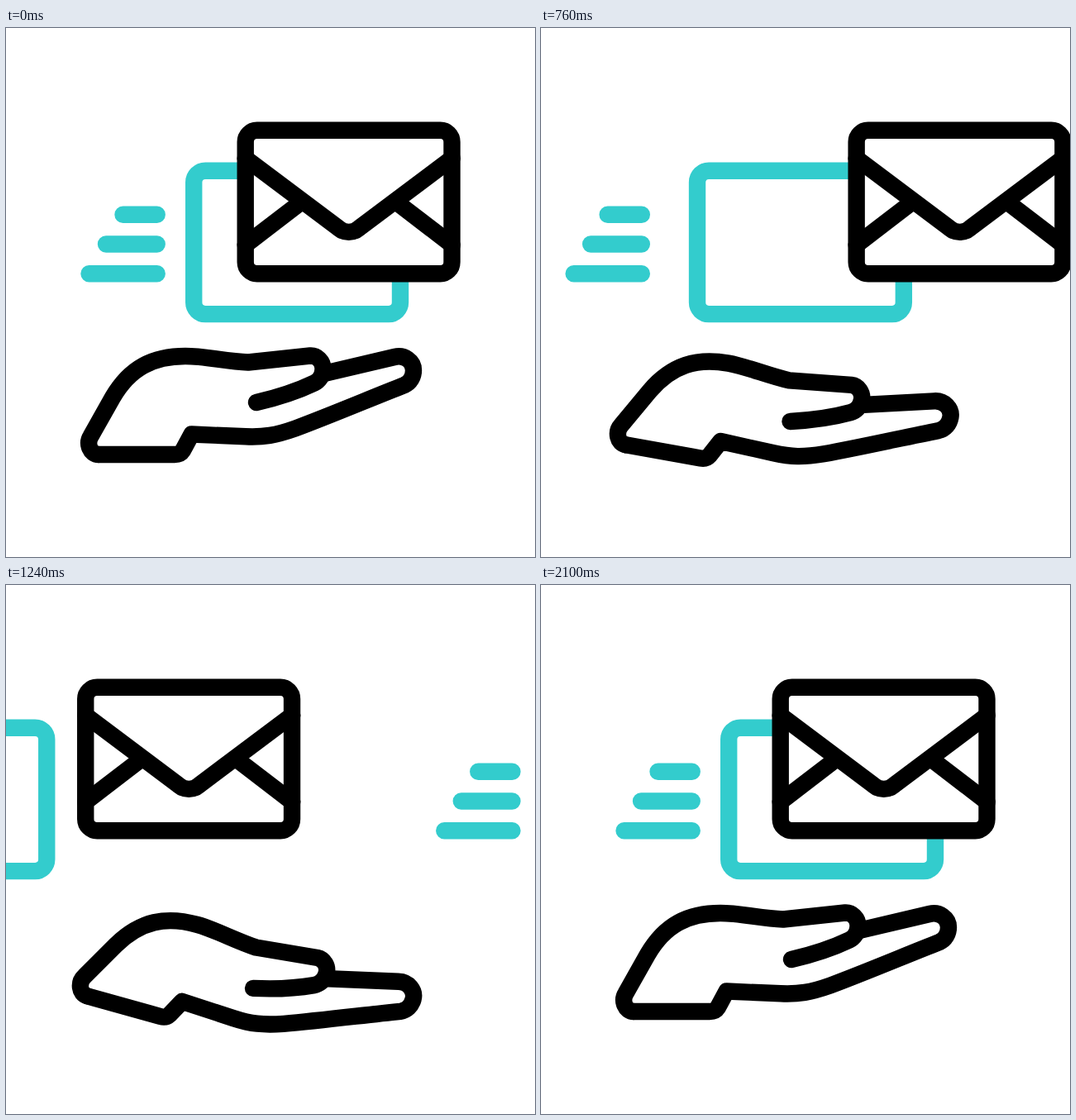
An HTML page for the animation above (2400 ms loop, 640x640 px).

```html
<!DOCTYPE html>
<html>
<head>
<meta charset="utf-8">
<style>
  html, body { margin: 0; height: 100%; overflow: hidden; background: #fff; }
  svg { display: block; width: 100%; height: 100%; }
  g { fill: none; stroke: #000; stroke-width: 20.4; stroke-linecap: round; stroke-linejoin: round; }
  .teal { stroke: #33cccd; }
  rect { fill: #fff; width: 249.8px; height: 173.4px; rx: 14px; }
</style>
</head>
<body>
<svg viewBox="0 0 640 640">
  <g id="hand">
    <path d="M112 516H204Q211 516 214 511L224.5 491.5L290 494.3C312 495.2 326 493 350 484.5C394 468 440 448.5 482 432C489 429 493 422 493 414C493 403 482 395 470 398L387 417.5"/>
    <path d="M303 453C327 447.5 350 440.5 373 429.5C378 427 383.5 421 383.5 412C383.5 403 376 396 368 396.5L293 404.5C265 403 240 397 217 397C178 397 150 411 129 447L102.5 494C97 503 102 516 112 516"/>
  </g>
  <g id="lines" class="teal">
    <path d="M141.5 225.7H182.7M121 261.5H182.7M100.5 297.3H182.7"/>
  </g>
  <g id="back" class="teal"><rect x="227.2" y="172.7"/></g>
  <g id="front">
    <rect x="289.7" y="123.8"/>
    <path d="M289.7 157.6L402 241.9C409.7 248.5 419.7 248.5 427.4 241.9L539.7 157.6M289.7 262.3L358 210M539.7 262.3L471.4 210"/>
  </g>
</svg>
<script>
const LOOP = 2400;

// Each layer makes the same flight with its own delays; room is its distance to the right edge
const layers = [
  { id: 'front', room: 361, out: 0, in: 0 },
  { id: 'back', room: 424, out: 103, in: 190 },
  { id: 'lines', room: 550, out: 226, in: 360 }
];

const el = id => document.getElementById(id);

function ease(t, from, to) {
  const u = Math.min(Math.max((t - from) / (to - from), 0), 1);
  return u * u * (3 - 2 * u);
}

// Distance covered when speeding up evenly for a while, then cruising
function run(t, speed, rise) {
  const s = Math.max(t, 0);
  return speed * (s < rise ? s * s / (2 * rise) : s - rise / 2);
}

// Draw back, then dash off to the right
const leave = t => -63 * ease(t, 0, 600) + run(t - 600, 1.33, 87);

// Dash in from the left, overshoot and settle
const enter = t => 26 * (1 - ease(t, 1450, 1746)) - run(1450 - t, 1.233, 64);

const tilt = t => -7.4 * ease(t, 0, 388) + 24.1 * ease(t, 388, 953)
  - 25.9 * ease(t, 1180, 1660) + 9.2 * ease(t, 1660, 2100);

function draw(t) {
  for (const l of layers) {
    const gone = leave(t - l.out);
    const x = gone < l.room ? gone : enter(t - l.in);
    el(l.id).setAttribute('transform', `translate(${x})`);
  }
  el('hand').setAttribute('transform', `rotate(${tilt(t)} 173.5 456)`);
}

let start;
function frame(now) {
  start ??= now;
  draw((now - start) % LOOP);
  requestAnimationFrame(frame);
}
draw(0);
requestAnimationFrame(frame);
</script>
</body>
</html>
```
